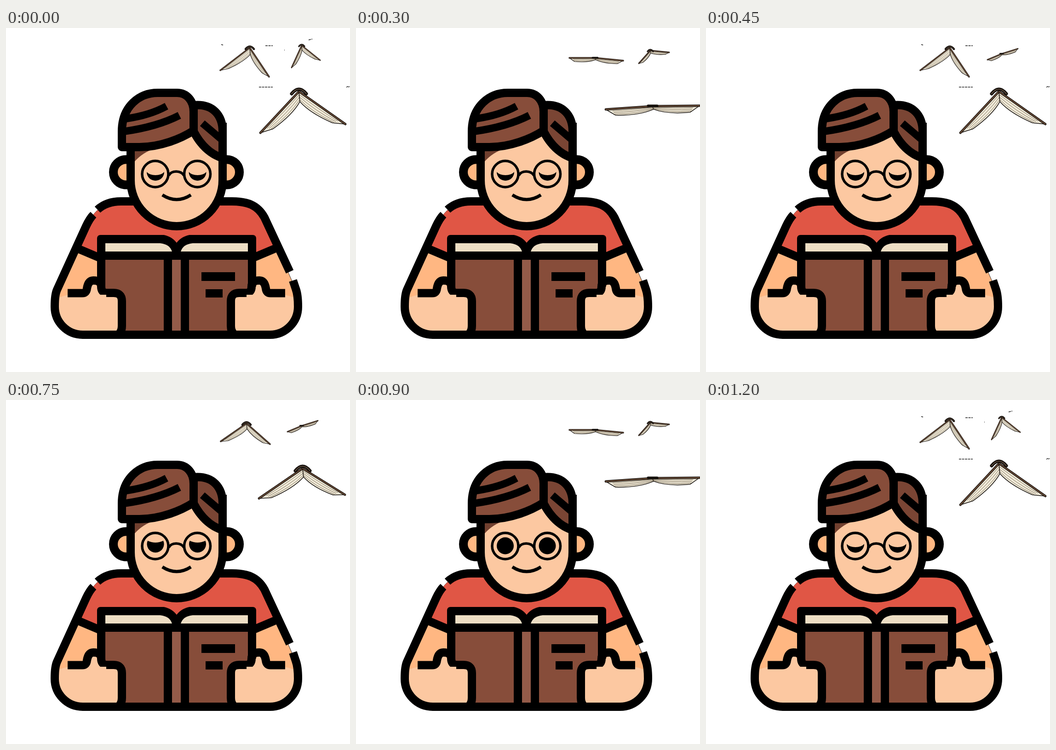
These frames come from a looping animation (748x748 px, 1300 ms). An HTML page:

```html
<!DOCTYPE html>
<html lang="en">
<head>
<meta charset="utf-8">
<title>Reader</title>
<style>
html, body { margin: 0; width: 100%; height: 100%; overflow: hidden; background: #fff; }
svg { display: block; width: 100vw; height: 100vh; }
.line { fill: none; stroke: #000; stroke-width: 18; }
.thin { fill: none; stroke: #000; stroke-width: 5.5; }
</style>
</head>
<body>
<svg viewBox="0 0 748 748">
  <defs>
    <g id="ear">
      <path d="M275 286H261A27.5 27.5 0 0 0 261 341H275" fill="#ffb782" stroke="#000" stroke-width="19"/>
    </g>
    <path id="forearm" d="M107 590Q125 581 140 580H215V667H167A61 61 0 0 1 106 606Z" fill="#fcc8a1"/>
    <g id="hand">
      <path d="M180 580Q180 556 191 552L205 574L218 580H234Q248 580 248 594V662H180Z" fill="#fcc8a1"/>
      <path class="line" d="M134 576.5H165Q175 577 176 566Q179 549 190 549Q207 549 207 562Q207 576 219 576H234Q252 576 252 594V648Q252 660 244 667"/>
    </g>
  </defs>

  <!-- body -->
  <path d="M250 377C228 377 212 383 195 400Q182 414 174 431L111 569Q106 580 106 605A61 61 0 0 0 167 667H574A61 61 0 0 0 635 606Q635 580 630 569L562 412C547 385 525 377 491 377Z" fill="#ffb782" stroke="#000" stroke-width=".8"/>
  <use href="#forearm"/>
  <use href="#forearm" transform="translate(741) scale(-1 1)"/>
  <path d="M250 377C228 377 212 383 195 400Q182 414 174 431L152 478L200 498H541L589 478L562 412C547 385 525 377 491 377Z" fill="#e05645"/>
  <path class="line" d="M290 377H250C228 377 212 383 199 395M190 406Q182 414 174 431L111 569Q106 580 106 605A61 61 0 0 0 167 667H574A61 61 0 0 0 635 606Q635 580 630 567L624 549M450 377H491C525 377 547 385 562 412L617 530M157 480L202 499M539 499L584 480"/>

  <!-- head -->
  <use href="#ear"/>
  <use href="#ear" transform="translate(741) scale(-1 1)"/>
  <path d="M271 215V331A100 100 0 0 0 471 331V215Z" fill="#fcc8a1" stroke="#000" stroke-width="18"/>
  <path d="M280 262H324Q298 270 280 290Z" fill="#71402f"/>
  <g stroke="#000" stroke-width="18" stroke-linejoin="round">
    <path d="M408 168C450 164 471 190 471 225V283C440 273 421 250 408 225Z" fill="#7a4534"/>
    <path d="M252 259V225C252 170 290 141 330 141H372C393 141 408 158 408 182V223C380 241 335 259 290 259Z" fill="#874d3a"/>
  </g>
  <path class="line" style="stroke-width:16" d="M262 197Q312 190 349 170M256 225Q328 215 377 190M427 207L467 241"/>

  <!-- face -->
  <circle class="thin" cx="324.5" cy="317.5" r="28.5"/>
  <circle class="thin" cx="416" cy="317.5" r="28.5"/>
  <path class="thin" d="M354 321Q358 312 370 312Q382 312 387 321"/>
  <path class="thin" style="stroke-width:7" d="M340 363Q371 383 402 363"/>
  <path id="eyeL"/>
  <path id="eyeR" transform="translate(91.5)"/>

  <!-- book -->
  <rect x="198" y="450" width="346" height="217" rx="7"/>
  <path d="M338 449Q360 452 371 467Q382 452 404 449Z" fill="#e05645"/>
  <path d="M216 468H335Q356 470 361 486H216ZM526 468H406Q385 470 380 486H526Z" fill="#eddec4"/>
  <path d="M216 504H343V658H216ZM398 504H526V658H398Z" fill="#874d3a"/>
  <path d="M361 504H380V658H361Z" fill="#945b49"/>
  <path d="M425 531H498V550H425ZM434 568H471V586H434Z"/>
  <use href="#hand"/>
  <use href="#hand" transform="translate(741) scale(-1 1)"/>
  <path d="M180 580H218V658H180ZM523 580H561V658H523Z" fill="#fcc8a1"/>
  <path class="line" d="M167 667H574"/>

  <g id="birds" stroke-linejoin="round" stroke-linecap="round"></g>
</svg>
<script>
const STEP = 150, LOOP = 1300;

// Each pose: spine, left tip, right tip.
const flocks = [
  { size: 1, poses: {
    low: [637, 138, 553, 228, 738, 209],
    mid: [645, 149, 550, 214, 737, 206],
    glide: [645, 156, 540, 192, 746, 188],
    flat: [645, 170, 543, 177, 747, 169],
    high: [646, 168, 547, 141, 746, 132] } },
  { size: .57, poses: {
    low: [530, 43, 466, 92, 572, 106],
    mid: [523, 51, 467, 90, 574, 96],
    glide: [521, 56, 463, 79, 581, 82],
    flat: [520, 65, 464, 65, 581, 71],
    high: [521, 63, 466, 46, 579, 42] } },
  { size: .38, poses: {
    low: [643, 38, 621, 86, 683, 70],
    glide: [641, 45, 621, 84, 682, 64],
    flat: [640, 49, 615, 77, 681, 53],
    tilt: [643, 56, 612, 69, 678, 45],
    high: [645, 62, 611, 61, 675, 42] } }
];

// Pose of the two big books, pose of the small book, eyes.
const steps = [
  ['low', 'low', 'shut'], ['glide', 'glide', 'shut'], ['flat', 'flat', 'shut'],
  ['low', 'tilt', 'shut'], ['high', 'high', 'half'], ['mid', 'tilt', 'half'],
  ['flat', 'flat', 'open'], ['glide', 'glide', 'open'], ['low', 'low', 'shut']
];

const eyes = {
  shut: 'M306 313A19 19 0 0 0 344 313Q338 320 325 320Q312 320 306 313Z',
  half: 'M308 306Q325 314 342 306A18.5 18.5 0 1 1 308 306Z',
  open: 'M306 317A18.5 18.5 0 0 1 343 317A18.5 18.5 0 0 1 306 317Z'
};

const mix = (a, b, k) => [a[0] + (b[0] - a[0]) * k, a[1] + (b[1] - a[1]) * k];
const move = (p, n, d) => [p[0] + n[0] * d, p[1] + n[1] * d];
const path = (d, fill, stroke, width) =>
  `<path d="${d}" fill="${fill}" stroke="${stroke}" stroke-width="${width}"/>`;

function wing(spine, tip, fold, side, size) {
  const dx = tip[0] - spine[0], dy = tip[1] - spine[1], len = Math.hypot(dx, dy);
  const normal = [-dy * side / len, dx * side / len];
  const hem = move(mix(tip, spine, .2), normal, 14 * size);
  const bend = move(mix(hem, fold, .62), normal, 9 * size);
  let out = path(`M${spine}L${tip}L${hem}Q${bend} ${fold}Z`, '#f1ebda', '#15100c', .8 + .7 * size);
  for (const k of [.3, .55, .8]) {
    const start = mix(mix(tip, spine, .12), hem, k);
    const control = mix(mix(tip, spine, .5), bend, k);
    out += path(`M${start}Q${control} ${mix(spine, fold, k)}`, 'none', '#75664f', .4 + .6 * size);
  }
  return out + path(`M${spine}L${tip}`, 'none', '#15100c', 1.6 + 3.2 * size)
    + path(`M${spine}L${tip}`, 'none', '#76543d', .5 + 1.5 * size);
}

function book(pose, size) {
  const [x, y, lx, ly, rx, ry] = pose;
  const droop = (ly + ry) / 2 - y;
  const fold = [x + 2 * size, y + 6 * size + .2 * Math.max(0, droop)];
  const cap = `M${x - 16 * size} ${y + 5 * size}Q${x} ${y - 15 * size} ${x + 16 * size} ${y + 5 * size}`;
  const hinge = droop > 12 * size
    ? path(cap, 'none', '#15100c', 1 + 6 * size) + path(cap, 'none', '#6b5746', 1.6 * size)
    : path(`M${x - 10 * size} ${y - size}h${20 * size}`, 'none', '#15100c', 1 + 4 * size);
  return wing([x, y], [lx, ly], fold, -1, size) + wing([x, y], [rx, ry], fold, 1, size) + hinge;
}

function specks(big, small) {
  let d = '';
  if (big === 'low') d += 'M468 36l4 1M564 38.5h16M550 128.5h30M740 129l3-2 1 2 3-2';
  if (small === 'low') d += 'M658 26l8-2M605 48h1';
  return `<path d="${d}" fill="none" stroke="#222" stroke-width="1.5" stroke-dasharray="5 1.5" stroke-linecap="butt"/>`;
}

const birds = document.getElementById('birds');
const eyeParts = ['eyeL', 'eyeR'].map(id => document.getElementById(id));
let shown = -1;

function draw(time) {
  const index = Math.floor((time % LOOP) / STEP);
  if (index === shown) return;
  shown = index;
  const [big, small, look] = steps[index];
  birds.innerHTML = flocks.map(({ size, poses }, i) =>
    book(poses[i < 2 ? big : small], size)).join('') + specks(big, small);
  eyeParts.forEach(eye => eye.setAttribute('d', eyes[look]));
}

const begin = performance.now();
function tick() {
  draw(performance.now() - begin);
  requestAnimationFrame(tick);
}
tick();
</script>
</body>
</html>
```
